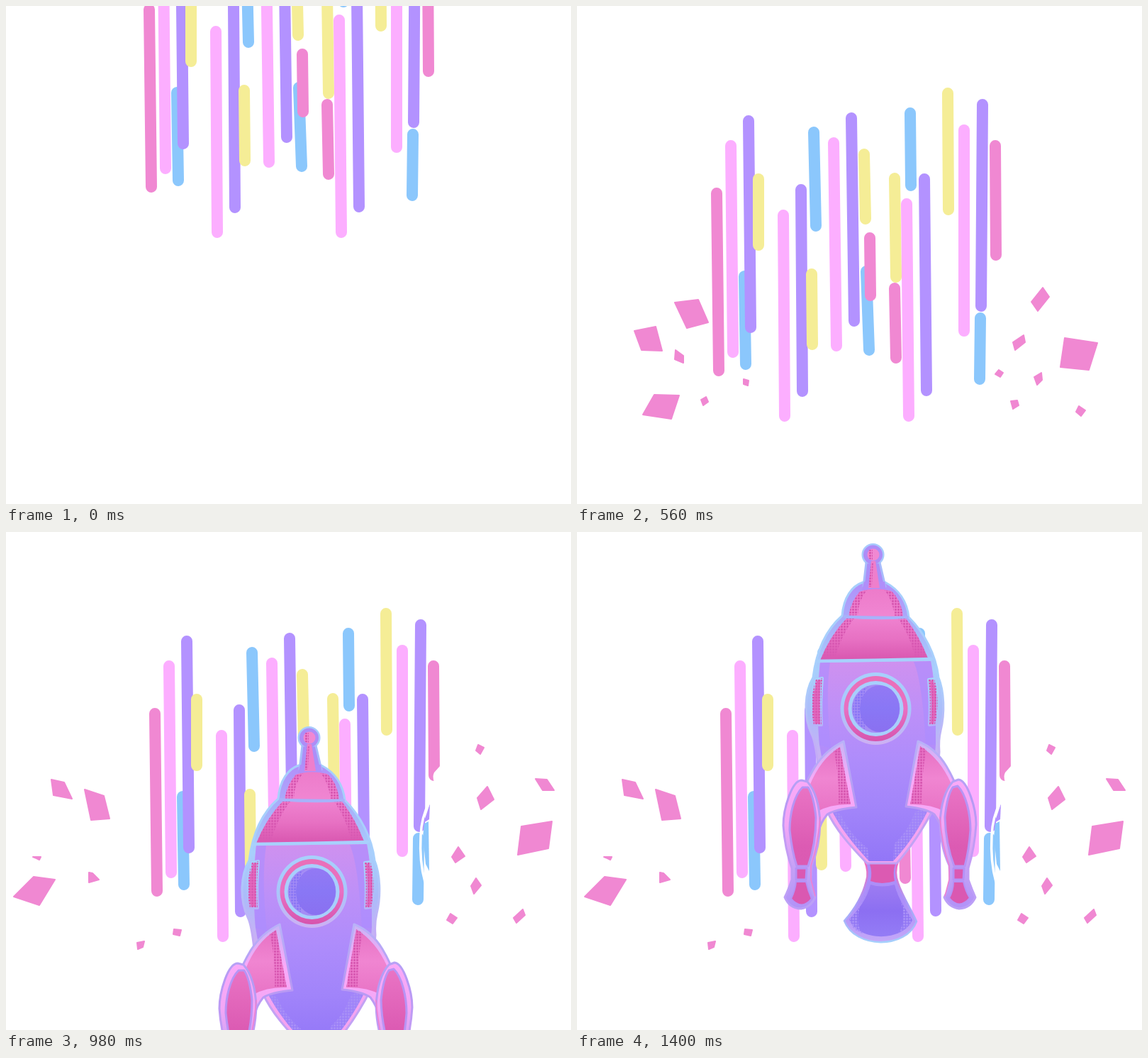
Recreate the animation shown at these times as an HTML page with a canvas. Size 797 by 702 pixels, loop 1470 ms.

```html
<!DOCTYPE html>
<html lang="en">
<head>
<meta charset="utf-8">
<title>Rocket launch</title>
<style>
html, body { margin: 0; width: 100%; height: 100%; overflow: hidden; background: #fff; }
canvas { display: block; }
</style>
</head>
<body>
<canvas id="stage" width="797" height="702"></canvas>
<script>
const ctx = document.getElementById('stage').getContext('2d');
const STEP = 70, STEPS = 21;
const PINK = '#f088d2', ROSE = '#fcaeff', VIOLET = '#b392ff', BLUE = '#8bc7fc', YELLOW = '#f5ed96';

// colour, top x, top y, bottom x, bottom y
const bars = [
  [PINK, 200, 180, 203, 446], [ROSE, 220, 113, 223, 420], [BLUE, 239, 297, 241, 437],
  [VIOLET, 245, 78, 248, 385], [YELLOW, 259, 160, 259, 269], [ROSE, 294, 211, 296, 510],
  [VIOLET, 319, 175, 321, 475], [YELLOW, 334, 294, 335, 409], [BLUE, 337, 94, 340, 242],
  [ROSE, 365, 109, 369, 411], [VIOLET, 390, 74, 394, 376], [YELLOW, 408, 125, 410, 232],
  [BLUE, 411, 290, 415, 417], [PINK, 416, 243, 417, 340], [YELLOW, 451, 159, 453, 314],
  [PINK, 451, 314, 453, 428], [ROSE, 468, 195, 471, 510], [BLUE, 473, 67, 474, 185],
  [VIOLET, 493, 160, 496, 474], [YELLOW, 526, 39, 527, 219], [ROSE, 549, 91, 549, 390],
  [VIOLET, 575, 55, 573, 355], [BLUE, 572, 356, 571, 458], [PINK, 593, 113, 594, 283]
];

const burst = new Path2D(`M81 458L111 452 120 486 91 485Z M138 418L171 414 185 446 155 454Z
  M139 485L150 493 150 503 138 498Z M109 548L144 549 133 582 93 576Z M182 551L185 558 178 563 175 555Z
  M235 526L242 528 241 535 235 533Z M657 397L666 410 650 430 641 417Z M630 464L632 474 618 485 615 474Z
  M688 468L734 475 722 513 682 509Z M655 517L656 527 649 534 645 523Z M595 513L601 517 597 523 590 519Z
  M612 557L621 556 623 563 615 568Z M708 564L717 570 711 578 704 572Z`);
const scatter = new Path2D(`M64 349L82 353 93 376 67 371Z M111 363L138 372 146 404 120 406Z
  M38 458L49 458 47 462 43 460Z M117 480L122 481 131 490 117 494Z M39 486L69 490 47 526 11 514Z
  M185 579L195 577 193 585 186 588Z M237 560L247 561 245 569 236 567Z M666 300L674 304 669 313 663 308Z
  M679 359L688 377 670 391 665 375Z M747 348L763 349 773 364 757 364Z M727 415L770 408 765 446 722 455Z
  M638 444L647 457 634 466 629 458Z M663 488L670 498 660 510 656 499Z M627 538L636 544 630 552 622 547Z
  M729 532L732 540 720 551 716 544Z`);

function vertical(y1, y2, ...colors) {
  const g = ctx.createLinearGradient(0, y1, 0, y2);
  colors.forEach((c, i) => g.addColorStop(i / (colors.length - 1), c));
  return g;
}

function halftone(color) {
  const tile = document.createElement('canvas');
  tile.width = tile.height = 4;
  const t = tile.getContext('2d');
  t.fillStyle = color;
  t.fillRect(0, 0, 3, 3);
  return ctx.createPattern(tile, 'repeat');
}

function shape(path, fill, stroke, width) {
  const p = path instanceof Path2D ? path : new Path2D(path);
  if (fill) { ctx.fillStyle = fill; ctx.fill(p); }
  if (stroke) { ctx.strokeStyle = stroke; ctx.lineWidth = width; ctx.stroke(p); }
}

function disc(x, y, rx, fill, ry = rx) {
  ctx.beginPath();
  ctx.ellipse(x, y, rx, ry, 0, 0, Math.PI * 2);
  ctx.fillStyle = fill;
  ctx.fill();
}

const rim = vertical(20, 400, '#a5cdfc', '#a8d0fc', '#a8d0fc', '#c3adf6', '#c3a2f4');
const finRim = vertical(295, 530, '#c8b4f6', '#f9a9f8', '#f4a7f6', '#c6a2f7', '#b193f8');
const finEdge = vertical(295, 530, '#b9b2f8', '#b69af4', '#c49cf4', '#bba0f7');
const finFill = vertical(300, 395, '#e66fc2', '#f085d1', '#e873c5');
const legFill = vertical(355, 530, '#ea75c5', '#dc5bb3', '#d958b1');
const dotsRose = halftone('#d95ab3'), dotsViolet = halftone('#a78ef7'), dotsDark = halftone('#8c78f5');

function drawBars(dx, dy) {
  ctx.lineWidth = 16;
  for (const [color, x1, y1, x2, y2] of bars) {
    ctx.strokeStyle = color;
    ctx.beginPath();
    ctx.moveTo(x1 + dx, y1 + dy + 8);
    ctx.lineTo(x2 + dx, y2 + dy - 8);
    ctx.stroke();
  }
}

function drawTears() {
  shape('M613 329L604 339Q601 345 604 352L615 354Z', '#fff');
  shape('M598 383L597 405 589 410Z', VIOLET);
  shape('M590 411L596 408 597 478 592 468 588 430Z', BLUE);
  shape('M597 381Q586 402 585 428Q583 465 591 493', null, '#fff', 3.5);
}

function drawShards(n) {
  if (n < 6) return;
  ctx.save();
  if (n < 8) {
    const k = n === 6 ? 0.5 : 0.8;
    ctx.translate(410, 560);
    ctx.scale(k, k);
    ctx.translate(-410, -560);
  }
  shape(n < 9 ? burst : scatter, PINK, PINK, 2);
  ctx.restore();
}

function drawNozzle() {
  shape('M406 464L453 464Q447 480 453 495C460 515 472 533 479 549C465 588 392 588 377 548C393 530 403 512 408 492Q412 480 406 464Z',
    vertical(465, 578, '#ad8df8', '#ad8ff9', '#c4a8f8'), vertical(465, 578, '#f568bd', '#a99cf8', '#a6d0fc'), 2.5);
  shape('M413 468L449 468Q445 480 448 492Q430 498 414 492Q417 480 413 468Z', '#dc5ab2');
  const flare = 'M414 497Q430 502 448 497C453 517 464 532 473 547C460 578 397 578 384 546C398 532 409 516 414 497Z';
  shape(flare, vertical(497, 572, '#9d7cf2', '#8c6ff2', '#947df6'));
  shape('M414 497C409 516 398 532 384 546Q388 562 403 566Q385 545 414 497ZM448 497C453 517 464 532 473 547Q467 560 453 565Q470 545 448 497Z', dotsViolet);
}

function drawHull() {
  const body = 'M343 184C339 215 338 260 342 300L358 390C372 418 390 440 412 464L446 464C470 438 486 412 498 386L506 300C506 260 506 215 499 182Z';
  shape('M403 71C388 76 376 92 374 118C352 137 338 165 333 205C321 225 319 260 331 285C336 295 338 310 340 330L352 392C365 420 385 442 409 467L451 467C475 440 490 415 504 388L511 310C510 298 511 288 513 280C519 255 518 225 510 205C506 172 490 142 468 120C465 95 452 80 435 71Z',
    vertical(70, 440, '#b28ffa', '#a8b0fa', '#a8cffc', '#abbcfa', '#c9b0f4', '#f3a6f3', '#f6a3f0'), rim, 3);
  shape(body, vertical(182, 465, '#cf91ef', '#bd90f8', '#ae8cfb', '#a184fa', '#9276f7'));
  shape('M475 183L499 182Q506 220 506 300L492 300Q487 210 475 183Z', 'rgba(173,142,255,.65)');
  shape('M343 184L357 184Q350 230 358 305L342 300Q339 230 343 184Z', 'rgba(173,142,255,.65)');
  shape('M358 390C372 418 390 440 412 464L410 446Q384 425 372 398ZM498 386C486 412 470 438 446 464L447 440Q469 420 476 395Z', dotsViolet);
}

function drawNose() {
  disc(417.5, 32, 16, '#a8cbfc');
  shape('M408 43L404 77 435 77 427 43Z', '#ac8ff8', '#a8bcfb', 3);
  disc(417.5, 32, 13.5, '#ae8df7');
  shape('M405 70L434 70 436 82 402 82Z', '#b08ffa');
  disc(418, 32, 8.5, PINK);
  shape('M415 41L421 41 427 79 411 79Z', '#ee7fcc');
  shape('M412 25L417 25 417 39 412 38ZM415 43L418 43 416 77 411 77Z', dotsRose);

  shape('M399 84Q420 77 443 83Q457 95 460 119L383 118Q387 97 399 84Z', vertical(80, 120, '#ed7bca', '#f086d2'));
  shape('M399 84L409 82Q397 96 396 117L383 118Q387 97 399 84ZM443 83L434 82Q445 96 448 118L460 119Q457 95 443 83Z', dotsRose);
  shape('M380 122L464 122Q482 145 495 178L343 181Q357 146 380 122Z', vertical(122, 180, '#ef81cf', '#e771c3', '#d957b0'));
  shape('M380 122L391 122Q374 143 363 180L343 181Q357 146 380 122ZM464 122L453 122Q470 145 477 178L495 178Q482 145 464 122Z', dotsRose);
  shape('M377 119Q420 123 466 120', null, '#a8b2fa', 4);
  shape('M338 182Q420 181 500 179', null, '#a8d0fc', 4.5);
}

function drawWindow() {
  const x = 421.5, y = 249;
  disc(x, y, 50, vertical(199, 299, '#a8d0fc', '#a9c6fb', '#cdb0f3'), 51);
  disc(x, y, 45, vertical(204, 294, '#ea6fb8', '#e870c3', '#d755ae'), 46);
  disc(x, y, 39, '#a8cffc');
  disc(x, y, 34, '#a58df5');
  shape('M413 217Q388 226 389 252Q391 270 406 278L406 223Z', dotsDark);
  disc(427, 249, 28, vertical(215, 283, '#9379f4', '#8977f5', '#8a70f0'), 33);
}

function drawPods() {
  const edge = vertical(204, 275, '#a8d0fc', '#a8c8fb', '#b7b2f8');
  const left = 'M337 208L346 206Q343 240 345 272L334 272Q327 238 337 208Z';
  const right = 'M496 208L504 207Q513 238 505 271L497 272Q499 240 496 208Z';
  for (const pod of [left, right]) {
    shape(pod, '#e56abf', edge, 4);
    shape(pod, dotsRose);
  }
}

function drawLeg(outer, calf, ankle, foot) {
  shape(outer, finRim, finEdge, 3);
  shape(calf, legFill, '#b894f5', 3);
  shape(ankle, '#da58b2', '#b592f6', 3);
  shape(foot, '#da58b1', '#b592f6', 2);
}

function drawFins() {
  shape('M376 295L394 388Q364 391 353 398Q343 410 340 425L316 372Q323 352 335 332Q350 308 376 295Z', finRim, finEdge, 3);
  shape('M371 303L386 384Q358 383 339 394L328 358Q343 320 371 303Z', finFill);
  shape('M371 303L386 384 369 384Q370 340 362 309Z', dotsRose);
  shape('M481 295L464 387Q493 390 504 398Q513 410 517 425L540 372Q533 350 521 330Q506 305 481 295Z', finRim, finEdge, 3);
  shape('M484 302L470 384Q499 383 518 394L528 355Q512 319 484 302Z', finFill);
  shape('M484 302L470 384 486 384Q486 340 493 307Z', dotsRose);

  drawLeg('M317 350C303 350 291 390 291 414Q293 445 303 474L303 490Q298 505 293 515Q300 531 316 531Q330 529 336 515Q329 502 330 488L331 470Q342 445 343 410Q341 370 325 352Z',
    'M318 360C306 372 300 398 300 420Q303 450 310 471L326 471Q337 440 337 402Q334 372 326 360Z',
    'M309 474L324 474 323 490 309 490Z',
    'M309 493L323 493Q326 506 331 517Q317 534 302 517Q308 505 309 493Z');
  drawLeg('M538 349C551 350 563 390 563 412Q561 445 552 474L552 490Q557 504 562 515Q555 530 539 531Q524 529 518 515Q525 503 526 488L525 470Q513 445 512 410Q514 370 530 352Z',
    'M537 358C549 370 555 398 555 420Q553 448 547 471L532 471Q520 440 519 402Q522 372 530 360Z',
    'M531 474L546 474 545 490 531 490Z',
    'M531 493L545 493Q548 506 554 516Q539 533 525 516Q531 505 531 493Z');
  shape('M343 402Q340 442 330 470L330 490 336 513', null, '#f37fd0', 1.5);
  shape('M512 402Q515 442 525 470L525 490 519 513', null, '#f37fd0', 1.5);
}

function drawRocket(dx, dy) {
  ctx.save();
  ctx.translate(dx, dy);
  drawNozzle();
  drawHull();
  drawNose();
  drawPods();
  drawWindow();
  drawFins();
  ctx.restore();
}

function barOffset(n) {
  if (n <= 5) return [2 - n / 2, 45.75 * (n - 4)];
  if (n <= 8) return [[-1.5, 78], [-2.5, 82], [-3, 76]][n - 6];
  return [10, 68];
}

function rocketOffset(n) {
  if (n <= 14) return [10, 258 + 65 * (14 - n)];
  if (n <= 16) return [-2 + 6 * (16 - n), 12 + 123 * (16 - n)];
  return [-2 + (n - 16) / 2, 3 * (20 - n)];
}

function render(time) {
  const n = Math.floor(time / STEP) % STEPS;
  ctx.fillStyle = '#fff';
  ctx.fillRect(0, 0, 797, 702);
  ctx.lineCap = ctx.lineJoin = 'round';
  drawBars(...barOffset(n));
  drawShards(n);
  if (n >= 9) {
    drawTears();
    drawRocket(...rocketOffset(n));
  }
}

function loop() {
  render(performance.now());
  requestAnimationFrame(loop);
}
loop();
</script>
</body>
</html>
```
